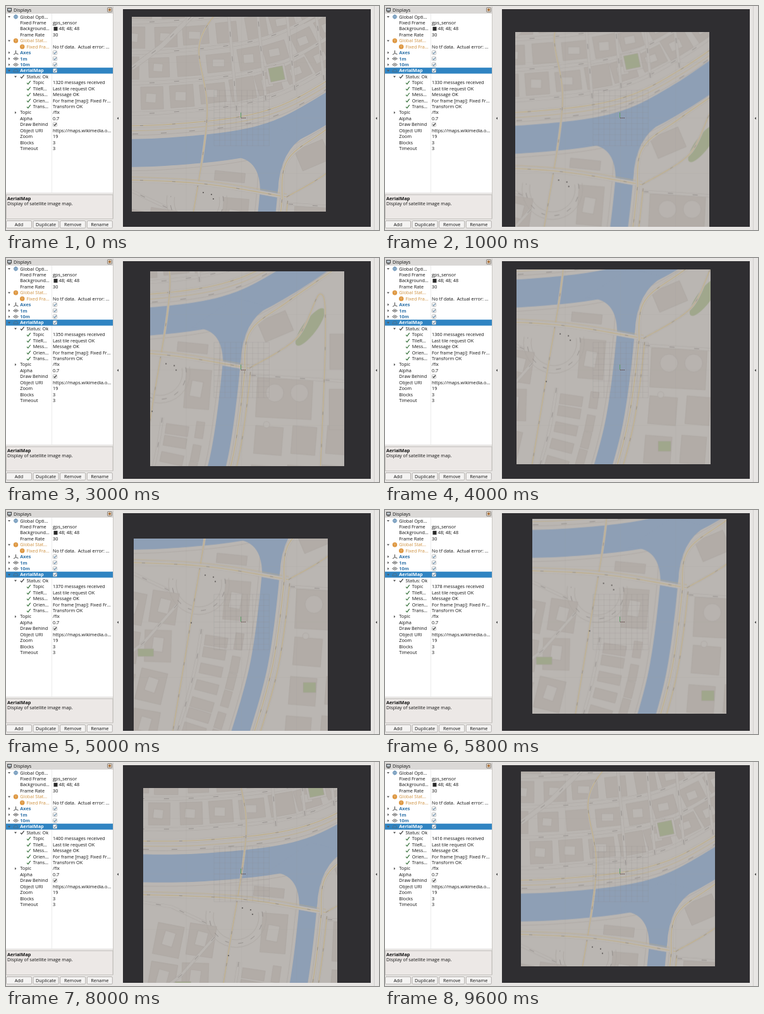
Animation of 590x353 px, one loop 9.8 s. Source, as an HTML page with a canvas:

```html
<!DOCTYPE html>
<html lang="en">
<head>
<meta charset="utf-8">
<title>Aerial map display</title>
<style>
  html, body { margin: 0; width: 100%; height: 100%; overflow: hidden; background: #e8e6e4; }
  svg, canvas { position: absolute; display: block; }
  svg { left: 0; top: 0; }
  canvas { left: 185px; top: 5px; }
  text { font: 500 7.3px "Open Sans", "Noto Sans", sans-serif; fill: #111; white-space: pre; }
  .b { font-weight: 700; }
  .mid { text-anchor: middle; }
</style>
</head>
<body>
<svg id="ui" width="590" height="353" viewBox="0 0 590 353"></svg>
<canvas id="view" width="392" height="343"></canvas>
<script>
/* ---------- side panel ---------- */
const BLUE = '#2f72a8', ORANGE = '#cd8f3d';

const rect = (x, y, w, h, fill, extra = '') =>
  `<rect x="${x}" y="${y}" width="${w}" height="${h}" fill="${fill}" ${extra}/>`;
const path = (d, stroke, w = 1) =>
  `<path d="${d}" fill="none" stroke="${stroke}" stroke-width="${w}"/>`;
const text = (x, y, s, attrs = '') => `<text x="${x}" y="${y}" ${attrs}>${s}</text>`;
const dot = (x, y, r, fill) => `<circle cx="${x}" cy="${y}" r="${r}" fill="${fill}"/>`;

const arrow = (x, y, open) =>
  `<path d="${open ? `M${x - 2} ${y - 1}h4l-2 2.6z` : `M${x - 1} ${y - 2}v4l2.4-2z`}" fill="#555"/>`;
const tick = (x, y, color) => path(`M${x - 2.6} ${y + .4}l1.8 2l3.8-5`, color, 1.1);
const checkbox = (x, y, color) =>
  rect(x - 3, y - 3, 6, 6, '#fff', 'rx="1" stroke="#aaa" stroke-width=".8"') +
  path(`M${x - 1.8} ${y}l1.4 1.6l2.6-3.4`, color, 1.1);

const icons = {
  gear: (x, y) => dot(x, y, 3.2, '#7a9fbf') + dot(x, y, 1.2, '#dce6ee') +
    path(`M${x - 4} ${y}h8M${x} ${y - 4}v8`, '#7a9fbf', .8),
  warn: (x, y) => dot(x, y, 3.7, '#dd9640') + path(`M${x - 2} ${y - 1}h4M${x} ${y - 2}v4`, '#e9b878', .8),
  axes: (x, y) => path(`M${x} ${y - 3.5}v4.5l4 1.5M${x} ${y + 1}l-3.5 2`, '#444'),
  grid: (x, y) => path(`M${x - 4} ${y}l4-2.4l4 2.4l-4 2.4zM${x - 2} ${y - 1.2}l4 2.4M${x + 2} ${y - 1.2}l-4 2.4`, '#555', .8),
  map: (x, y) => path(`M${x - 4} ${y + 2}l2-4h4l2 4z`, '#4b6c86', .9)
};

// [indent, label, value, options]
const head = (icon, color, open) => ({ icon, color, open, bold: true, box: true });
const rows = [
  [0, 'Global Opti…', '', { open: true, icon: 'gear' }],
  [0, 'Fixed Frame', 'gps_sensor'],
  [0, 'Background…', '48; 48; 48', { swatch: true }],
  [0, 'Frame Rate', '30'],
  [0, 'Global Stat…', '', { open: true, icon: 'warn', color: ORANGE }],
  [1, 'Fixed Fra…', 'No tf data.  Actual error: …', { icon: 'warn', color: ORANGE }],
  [0, 'Axes', '', head('axes', BLUE, false)],
  [0, '1m', '', head('grid', BLUE, false)],
  [0, '10m', '', head('grid', BLUE, false)],
  [0, 'AerialMap', '', { ...head('map', '#fff', true), selected: true }],
  [1, 'Status: Ok', '', { open: true, tick: '#333' }],
  [2, 'Topic', '', { id: 'count' }],
  [2, 'TileR…', 'Last tile request OK'],
  [2, 'Mess…', 'Message OK'],
  [2, 'Orien…', 'For frame [map]: Fixed Fr…'],
  [2, 'Trans…', 'Transform OK'],
  [0, 'Topic', '/fix', { open: false, arrowX: 15 }],
  [0, 'Alpha', '0.7'],
  [0, 'Draw Behind', '', { box: true }],
  [0, 'Object URI', 'https://maps.wikimedia.o…'],
  [0, 'Zoom', '19'],
  [0, 'Blocks', '3'],
  [0, 'Timeout', '3']
];

function row([indent, label, value, o = {}], i) {
  const x = 22.3 + 10.2 * indent, y = 17 + i * 9.43;
  const check = o.tick || indent === 2 && '#2c6b31';
  let s = '';
  if (o.selected) s += rect(0, y - 4.7, 169, 9.4, '#3084c2');
  if ('open' in o) s += arrow(o.arrowX || 5 + 10 * indent, y, o.open);
  if (o.icon) s += icons[o.icon](x - 6.8, y);
  if (check) s += tick(x - 7, y, check);
  if (o.box) s += checkbox(77.5, y, o.bold ? '#5b7f9c' : '#222');
  if (o.swatch) s += rect(75.5, y - 3, 6, 6, '#2b2b2b');
  s += text(x, y + 2.6, label, `${o.bold ? 'class="b"' : ''} style="fill:${o.color || '#111'}"`);
  return s + text(o.swatch ? 83.5 : 74, y + 2.6, value, o.id ? `id="${o.id}"` : '');
}

const button = (label, i) =>
  rect(.5 + i * 42.6, 338.5, 40, 11.5, '#f4f3f2', 'rx="1.5" stroke="#b3b0ad"') +
  text(20.5 + i * 42.6, 347, label, 'class="mid"');

document.getElementById('ui').innerHTML =
  rect(0, 0, 590, 353, '#e8e6e4') + rect(0, 1, 169, 11, '#dad8d6') +
  rect(2, 3, 7, 5.5, '#444') + rect(3, 4, 5, 3.3, '#b9c3ca') + path('M3.5 9.5h4', '#444') +
  text(12, 9, 'Displays') +
  rect(160.5, 2.5, 7, 7, '#d8cfc6', 'rx="1" stroke="#77706a" stroke-width=".8"') + dot(164, 6, 2, '#a9713a') +
  rect(0, 12, 169, 282, '#fff') + path('M72.5 12V294', '#ececec') + path('M169.5 1V335', '#c9c6c3') +
  rows.map(row).join('') +
  rect(.5, 297.5, 168.5, 38, '#ece8e6', 'stroke="#c4c1be"') +
  text(2, 305.5, 'AerialMap', 'class="b"') + text(2, 314, 'Display of satellite image map.') +
  ['Add', 'Duplicate', 'Remove', 'Rename'].map(button).join('') +
  '<path d="M178 175v4l-2.4-2zM587 175v4l-2.4-2z" fill="#444"/>' + path('M582.5 0V353', '#d2d0ce');

/* ---------- map ---------- */
const LAND = '#bab6b2', BLOCK = '#b2aca7', EDGE = '#a9a39e', WATER = '#8e9fb5',
      ROAD = '#c0ae85', GREEN = '#a0a78c', LINE = '#aca7a3', NAME = '#8b8683';
const MAP_X = 110, MAP_Y = -50;
const mapCanvas = document.createElement('canvas');
mapCanvas.width = 530;
mapCanvas.height = 650;
const m = mapCanvas.getContext('2d');
m.translate(-MAP_X, -MAP_Y);

let seed = 7;
const rnd = () => (seed = seed * 16807 % 2147483647) / 2147483647;

// Catmull-Rom curve through a few key points, as a list of [x, y]
function spline(...keys) {
  const at = i => keys[Math.min(Math.max(i, 0), keys.length - 1)];
  const out = [];
  for (let i = 0; i < keys.length - 1; i++) {
    for (let u = 0; u < 1; u += 1 / 16) {
      out.push([0, 1].map(k => {
        const [a, b, c, d] = [-1, 0, 1, 2].map(j => at(i + j)[k]);
        return b + u / 2 * (c - a + u * (2 * a - 5 * b + 4 * c - d + u * (3 * (b - c) + d - a)));
      }));
    }
  }
  return [...out, at(keys.length)];
}
const shift = (curve, dx, dy) => curve.map(([x, y]) => [x + dx, y + dy]);

function line(curve, color, w, dash = []) {
  m.beginPath();
  curve.forEach(p => m.lineTo(...p));
  m.setLineDash(dash);
  m.strokeStyle = color;
  m.lineWidth = w;
  m.stroke();
}
function fill(color, edge) {
  m.setLineDash([]);
  m.fillStyle = color;
  m.fill();
  if (!edge) return;
  m.strokeStyle = edge;
  m.lineWidth = .5;
  m.stroke();
}
function block(x, y, w, h, angle = 0, color = BLOCK, court = false) {
  m.save();
  m.translate(x, y);
  m.rotate(angle);
  m.beginPath();
  m.rect(-w / 2, -h / 2, w, h);
  fill(color, EDGE);
  if (court) block(-w * .05, 0, w * .45, h * .4, .1, LAND);
  m.restore();
}
function disc(x, y, r, color) {
  m.beginPath();
  m.arc(x, y, r, 0, 7);
  fill(color, EDGE);
}
// Calls fn(x, y, angle) at even steps along a curve
function along(curve, step, fn) {
  let left = step / 2;
  curve.slice(1).forEach(([x, y], i) => {
    const dx = x - curve[i][0], dy = y - curve[i][1];
    left -= Math.hypot(dx, dy);
    if (left > 0) return;
    left += step;
    fn(x, y, Math.atan2(dy, dx));
  });
}
function street(curve, w = 5) {
  line(curve, LINE, w + .8);
  line(curve, LAND, w);
  line(curve, NAME, .8, [8, 31]);
}
function road(curve, w = 5) {
  line(curve, '#b0aba7', w + .8);
  line(curve, '#bcb8b3', w);
  line(curve, ROAD, 1.1);
  line(curve, NAME, .8, [5, 46]);
}

const river = spline([110, 231], [250, 230], [400, 211], [506, 162], [640, 68]);
const canal = spline([417, 215], [416, 290], [397, 435], [362, 560]);
const avenue = spline([350, -10], [306, 60], [318, 175], [289, 369], [260, 545]);
const cross = spline([110, 272], [300, 279], [444, 301]);
const ring = spline([444, 301], [519, 253], [556, 184], [564, 258], [552, 550]);
const eastQuay = spline([437, 315], [444, 245], [506, 195], [640, 104]);

function drawMap() {
  m.fillStyle = LAND;
  m.fillRect(MAP_X, MAP_Y, 530, 650);

  // north: rows of courtyards that follow the river
  for (let i = 0; i < 5; i++) {
    along(shift(river, i * 11, -86 - 48 * i), 47, (x, y, a) =>
      block(x, y, 32 + rnd() * 10, 28 + rnd() * 10, a, BLOCK, rnd() > .3));
    street(shift(river, 0, -62 - 48 * i));
  }
  block(428, 107, 30, 28, -.2, LAND);
  block(428, 107, 23, 22, -.2, GREEN);
  street([[199, 98], [245, 64], [300, 10]], 7);
  for (let x = 365; x < 520; x += 46) street([[x, 165 - (x - 365) * .35], [x - 14, 0]], 4);

  // south-west: strips along the canal, larger blocks by the avenue
  const south = canal.filter(p => p[1] > 375);
  along(shift(south, -74, 0), 25, (x, y, a) => block(x, y, 16, 36, a));
  along(shift(south, -38, 0), 32, (x, y, a) => block(x, y, 26, 13, a));
  street(shift(south, -100, 0), 4);
  const west = avenue.filter(p => p[1] > 305);
  [46, 98].forEach(d => along(shift(west, -d, 0), 64, (x, y, a) =>
    block(x, y, 50, 42, a + rnd() * .4 - .2, BLOCK, true)));
  block(354, 269, 48, 15, .1);
  block(362, 334, 40, 62, .08, BLOCK, true);
  block(218, 416, 25, 12, 0, GREEN);
  street([[255, 318], [200, 292], [150, 284]], 4);
  street([[268, 340], [215, 400], [150, 450]], 4);
  [36, 42, 48].forEach(r => {
    m.beginPath();
    m.arc(302, 308, r, -.2, Math.PI + .2);
    m.setLineDash(r === 42 ? [8, 13] : []);
    m.strokeStyle = r === 42 ? NAME : LINE;
    m.lineWidth = .8;
    m.stroke();
  });

  // east: a loose grid with one large hall
  for (let y = 415; y < 560; y += 62) {
    for (let x = 474; x < 640; x += 56) block(x - (y - 415) / 8, y, 38 + rnd() * 8, 44, .08);
  }
  block(586, 275, 30, 56);
  block(586, 366, 32, 64);
  block(499, 349, 88, 62, .05);
  [484, 523].forEach(x => disc(x, 340, 14, '#b8b3af'));
  disc(471, 390, 5, LAND);
  block(477, 471, 20, 16, 0, GREEN);
  block(485, 235, 48, 34, -.4);
  m.beginPath();
  m.ellipse(540, 236, 36, 11, -.93, 0, 7);
  fill(GREEN);
  street([[446, 312], [600, 322]], 4);

  // water, with rounded corners at the mouth of the canal
  [-28, 28].forEach(d => line(shift(river, 0, d), LINE, .7));
  [-19, 19].forEach(d => line(shift(canal, d, 0), LINE, .7));
  line(river, WATER, 44);
  line(canal, WATER, 28);
  m.beginPath();
  m.moveTo(350, 238);
  m.quadraticCurveTo(401, 234, 402, 290);
  m.lineTo(430, 290);
  m.quadraticCurveTo(434, 226, 475, 204);
  m.lineTo(420, 190);
  fill(WATER);

  // main roads
  const quay = shift(river, 0, -43);
  const bankRoad = shift(canal.filter(p => p[1] > 300), 22, 0);
  road(quay);
  line(shift(quay, 0, 8), ROAD, .7);
  line(shift(quay, 0, 13), NAME, .8, [9, 36]);
  road(avenue, 3);
  road(cross, 6);
  line(shift(cross, 0, -5), ROAD, .6);
  road(eastQuay);
  road(bankRoad);
  road(shift(bankRoad, 9, 2), 3);
  road(ring, 3);
  m.fillStyle = '#6b6765';
  [[312, 294], [325, 297], [328, 304], [290, 369]].forEach(([x, y]) => m.fillRect(x - 1, y - 1, 2, 2));
}
drawMap();

/* ---------- viewport ---------- */
const LOOP = 9800, STEP = 200, LOAD = 80, SPAN = 7, TILE = 307 / SPAN;
const CX = 372, CY = 177.3;
const c = document.getElementById('view').getContext('2d');
const count = document.getElementById('count');
c.translate(-185, -5);

// The sensor drives an ellipse, one lap in ten seconds
function offset(t) {
  const a = (t * .036 + 1.35) * Math.PI / 180;
  return [1.5 - 64 * Math.sin(a), 95.7 * (Math.cos(a) - 1)];
}
function tileAt(t) {
  const [x, y] = offset(t);
  return [Math.floor((CX - x - 199) / TILE) - 3, Math.floor((CY - y - 17) / TILE) - 3];
}

function grid(cell, n, color) {
  const x = CX + .7, y = CY - .8, h = cell * n / 2;
  c.strokeStyle = color;
  c.lineWidth = .6;
  c.beginPath();
  for (let d = -h; d < h + 1; d += cell) {
    c.moveTo(x + d, y - h);
    c.lineTo(x + d, y + h);
    c.moveTo(x - h, y + d);
    c.lineTo(x + h, y + d);
  }
  c.stroke();
}

function draw(t) {
  const [ox, oy] = offset(t), now = tileAt(t), old = tileAt(t - LOAD);
  // Tiles that have just come into range are still loading
  const [x0, y0] = now.map((v, i) => Math.max(v, old[i]));
  const [x1, y1] = now.map((v, i) => Math.min(v, old[i]) + SPAN);
  c.fillStyle = '#2f2e31';
  c.fillRect(185, 5, 392, 343);
  c.save();
  c.beginPath();
  c.rect(Math.round(199 + x0 * TILE + ox), Math.round(17 + y0 * TILE + oy),
    Math.round((x1 - x0) * TILE), Math.round((y1 - y0) * TILE));
  c.clip();
  c.drawImage(mapCanvas, MAP_X + ox, MAP_Y + oy);
  grid(87.4, 10, 'rgba(160,158,156,.2)');
  grid(8.74, 10, 'rgba(140,136,133,.28)');
  c.restore();
  c.fillStyle = '#5aa066';
  c.fillRect(371, 168, 1, 8);
  c.fillStyle = '#4a2826';
  for (let x = 372; x < 380; x += 2) c.fillRect(x, 176, 1, 1);
  count.textContent = `${1320 + t / 100} messages received`;
}

let shown = -1;
function frame() {
  const t = Math.floor(performance.now() % LOOP / STEP) * STEP;
  if (t !== shown) draw(shown = t);
  requestAnimationFrame(frame);
}
frame();
</script>
</body>
</html>
```
